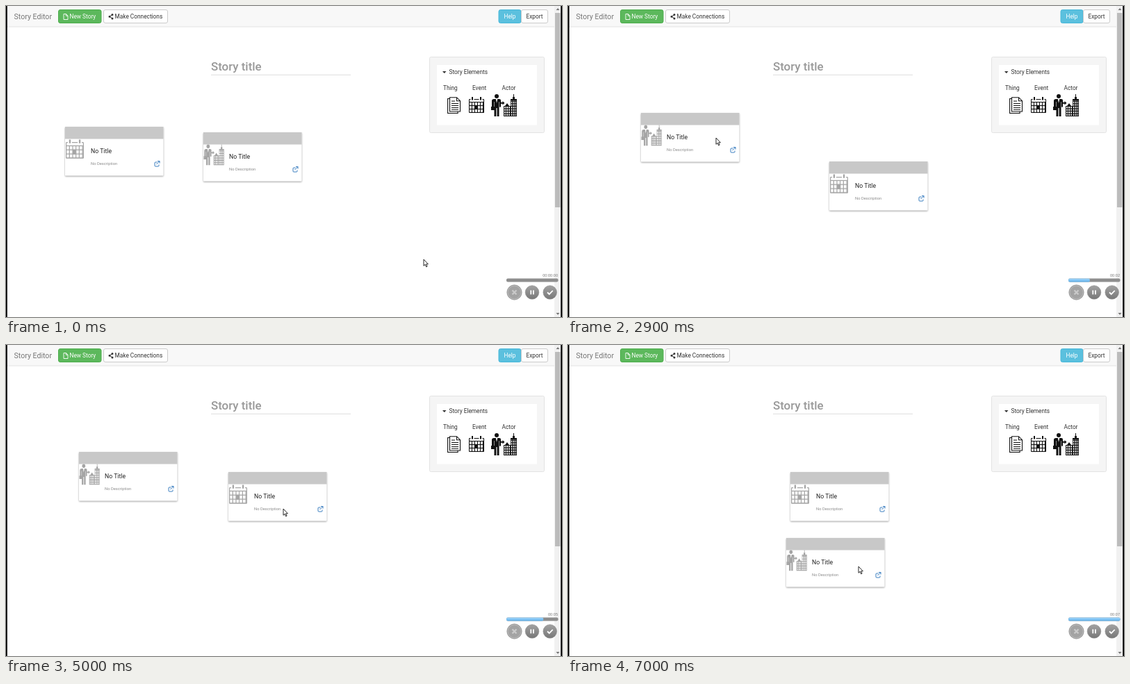
Write an HTML page that moves like this. It is 800x448 px and loops after 7100 ms.

```html
<!DOCTYPE html>
<html lang="en">
<head>
<meta charset="utf-8">
<title>Story Editor</title>
<style>
html, body { margin: 0; width: 100%; height: 100%; overflow: hidden; background: #fff; }
svg { display: block; width: 800px; height: 448px; font: 8.3px Roboto, sans-serif; fill: #333; }
.title { font-size: 8.7px; fill: #222; }
.note { font-size: 5.8px; fill: #8c8c8c; }
.line { fill: none; stroke: currentColor; }
.solid { fill: currentColor; }
.shadow { filter: drop-shadow(0 1px .8px rgba(0, 0, 0, .38)); }
#clock { font: 5.6px 'Liberation Sans', Arial, sans-serif; fill: #777; }
</style>
</head>
<body>
<svg viewBox="0 0 800 448">
  <defs>
    <linearGradient id="knob" x2="0" y2="1">
      <stop stop-color="#a2a2a2"/><stop offset="1" stop-color="#777"/>
    </linearGradient>
    <linearGradient id="blue" x2="0" y2="1">
      <stop stop-color="#a5d8fb"/><stop offset="1" stop-color="#5fb0ea"/>
    </linearGradient>
    <pattern id="days" patternUnits="userSpaceOnUse" x="1" y="8" width="4" height="5">
      <rect width="2.9" height="3.9" fill="#fff"/>
    </pattern>
    <pattern id="windows" patternUnits="userSpaceOnUse" x="19" y="18" width="3.2" height="3.6">
      <rect width="1.9" height="2.3" fill="#fff"/>
    </pattern>
    <g id="calendar">
      <rect class="solid" y="3" width="22" height="20" rx="1"/>
      <path fill="#fff" d="M1 4h20v3H1zM2.500 2h5v3h-5zM14.500 2h5v3h-5z"/>
      <rect x="1" y="8" width="20" height="14" fill="url(#days)"/>
      <path class="solid" d="M4 0h2v4.500H4zM16 0h2v4.500h-2zM8.500 12h4v6h-4z"/>
    </g>
    <g id="actor">
      <circle class="solid" cx="8" cy="3" r="3"/>
      <path class="solid" d="M4 7h8q2 0 2 2v9.500h-2V11h-.5v21H8.600V20H7.400v12H4.500V11H4v7.500H1V9.500Q1 7 4 7zM0 18h4.500v5H0zM14 11.700h2.500V10l3 2.700-3 2.700v-1.700H14z"/>
      <path fill="#fff" d="M6.800 7h2.400L8 13z"/>
      <path class="solid" d="M18 32V17h2l3-4 3 4h2v15zM28 32V7h3V4h1V0h1v4h1v3h3v25z"/>
      <path fill="url(#windows)" d="M19 18h8v13h-8zM28.500 9h7.500v22h-7.500z"/>
    </g>
    <g id="card">
      <rect class="shadow" width="141.500" height="70.500" rx="1" fill="#fff"/>
      <path fill="#c8c8c8" d="M0 0h141.500v17.500H0z"/>
      <text class="title" x="37" y="38.300">No Title</text>
      <text class="note" x="37" y="54.700">No Description</text>
      <path class="line" color="#3b7ec0" d="M132.500 51h-2.500q-1 0-1 1v4q0 1 1 1h4q1 0 1-1v-1.500M131.500 54l4.500-4.500M133 49.500h3v3"/>
    </g>
  </defs>

  <path fill="#f8f8f8" d="M0 0h789v30H0z"/>
  <path fill="#e4e4e4" d="M0 29.500h789v1H0z"/>
  <text x="11.500" y="19" font-size="10.600" fill="#777">Story Editor</text>
  <g id="buttons"></g>
  <path class="line" color="#fff" stroke-width=".9" d="M83 11.500h3.500l2.500 2.500v5.500h-6zM86.300 11.500v2.700H89"/>
  <path class="line" color="#333" d="M153 12.500l-4 2.700 4 2.800"/>
  <path class="line" color="#333" stroke-width="3" stroke-linecap="round" d="M149 15.200h0M153 12.500h0M153 18h0"/>

  <text x="295" y="93" font-size="16.900" font-weight="500" fill="#999">Story title</text>
  <path fill="#ddd" d="M295 98.700h201v1H295z"/>

  <rect x="609.500" y="73.500" width="165" height="109" rx="2" fill="#f5f5f5" stroke="#e3e3e3"/>
  <path fill="#fff" d="M620 85h144v86.500H620z"/>
  <path d="M628 94h5.500l-2.750 3z"/>
  <text x="637.500" y="98">Story Elements</text>
  <text x="629" y="121.300">Thing</text>
  <text x="671" y="121.300">Event</text>
  <text x="713.500" y="121.300">Actor</text>
  <g color="#111">
    <path class="line" stroke-width="1.100" d="M638 133.500h-2.400v21h14.500v-2M638.500 131.700h10l5 5v15.300h-15zM648.500 131.700v5h5M641 137h5M641 140.500h10M641 143.500h10M641 146.500h10M641 149.200h10"/>
    <use href="#calendar" x="666" y="131"/>
    <use href="#actor" x="698" y="127"/>
  </g>

  <g id="actorCard">
    <use href="#card"/>
    <use href="#actor" color="#a5a5a5" transform="translate(.5 17.500) scale(.79 .93)"/>
  </g>
  <g id="eventCard">
    <use href="#card"/>
    <use href="#calendar" color="#a5a5a5" transform="translate(1 18.500) scale(1.180)"/>
  </g>

  <path fill="#f1f1f1" d="M789 0h9v448h-9z"/>
  <path fill="#bcbcbc" d="M790 10h7.500v280H790z"/>
  <path fill="#777" d="M791.500 6h5L794 3zM791.500 442h5l-2.500 3z"/>
  <path fill="#000" d="M0 0h1.800v448H0zM798.200 0h1.800v448h-1.800z"/>

  <text id="clock" x="794" y="390" text-anchor="end"></text>
  <rect x="720" y="392.500" width="74.500" height="5" rx="2" fill="#8e8e8e"/>
  <rect id="bar" x="720" y="392.500" height="5" rx="2" fill="url(#blue)"/>
  <g fill="url(#knob)" stroke="#8a8a8a" stroke-width=".6">
    <circle cx="731.500" cy="412.500" r="10.700" fill="#a3a3a3"/>
    <circle cx="757" cy="412.500" r="9.800"/>
    <circle cx="782.700" cy="412.500" r="9.800"/>
  </g>
  <circle class="line" cx="731.500" cy="412.500" r="9.500" color="#bbb"/>
  <path class="line" color="#c9c9c9" stroke-width="2.400" d="M728.500 409.500l6 6m0-6l-6 6"/>
  <path class="line" color="#fff" stroke-width="1.800" d="M755.300 409.500v6M758.900 409.500v6M779 412.500l2.700 2.700 5-5.200"/>

  <path id="cursor" fill="#fff" stroke="#111" stroke-width=".9" stroke-linejoin="round"
    d="M0 0v9.300l2.100-2 1.500 3.500 1.500-.7-1.500-3.300h2.800z"/>
</svg>
<script>
const LOOP = 7100, STEP = 100;
const $ = id => document.getElementById(id);

function button(label, x, width, textX, fill, border, color) {
  $('buttons').innerHTML += `<rect x="${x}" y="5.5" width="${width}" height="19" rx="2.5" fill="${fill}" stroke="${border}"/>
    <text x="${textX}" y="18.3" fill="${color}">${label}</text>`;
}
button('New Story', 75.5, 61.5, 91.5, '#5cb85c', '#4cae4c', '#fff');
button('Make Connections', 140.5, 92, 156.5, '#fff', '#ccc', '#333');
button('Help', 709, 32, 716.5, '#5bc0de', '#46b8da', '#fff');
button('Export', 741.5, 38, 748.5, '#fff', '#ccc', '#333');

const home = { actorCard: [284, 182], eventCard: [85, 174] };

// The pointer grabs a card at `grip` and pulls it to each stop in turn.
const drags = [
  { card: 'actorCard', grip: [62, 44], start: 400, stops: [{ at: 800, to: [385, 272] }, { at: 1240, to: [199, 263] }] },
  { card: 'eventCard', grip: [97, 44], start: 1600, stops: [{ at: 2000, to: [340, 215] }, { at: 2200, to: [376, 224] }] },
  { card: 'actorCard', grip: [108, 36], start: 2400, stops: [{ at: 2900, to: [105, 154] }] },
  { card: 'eventCard', grip: [79, 53], start: 3500, stops: [{ at: 4200, to: [259, 155] }, { at: 5000, to: [320, 183] }] },
  { card: 'actorCard', grip: [104, 41], start: 5600, stops: [{ at: 5900, to: [119, 168] }, { at: 6400, to: [190, 270] }, { at: 7000, to: [314, 278] }] }
];

const add = (a, b) => a.map((v, i) => v + b[i]);

function glide(from, to, start, end, t) {
  const u = Math.min(1, Math.max(0, (t - start) / (end - start)));
  return from.map((v, i) => v + (to[i] - v) * u * u * (3 - 2 * u));
}

function pose(t) {
  const at = { ...home, cursor: [601, 365] };
  let free = 0;
  for (const { card, grip, start, stops } of drags) {
    if (t < free) break;
    at.cursor = glide(at.cursor, add(at[card], grip), free, start, t);
    free = start;
    for (const stop of stops) {
      if (t < free) break;
      at[card] = glide(at[card], stop.to, free, stop.at, t);
      if (t >= start) at.cursor = add(at[card], grip);
      free = stop.at;
    }
  }
  return at;
}

function draw(now) {
  const t = Math.floor(now % LOOP / STEP) * STEP;
  for (const [id, point] of Object.entries(pose(t))) $(id).setAttribute('transform', `translate(${point})`);
  $('bar').setAttribute('width', 74.5 * t / 7000);
  $('clock').textContent = t ? '00:0' + Math.floor(t * 1.02 / 1000) : '00:00:00';
  requestAnimationFrame(draw);
}
draw(0);
</script>
</body>
</html>
```
